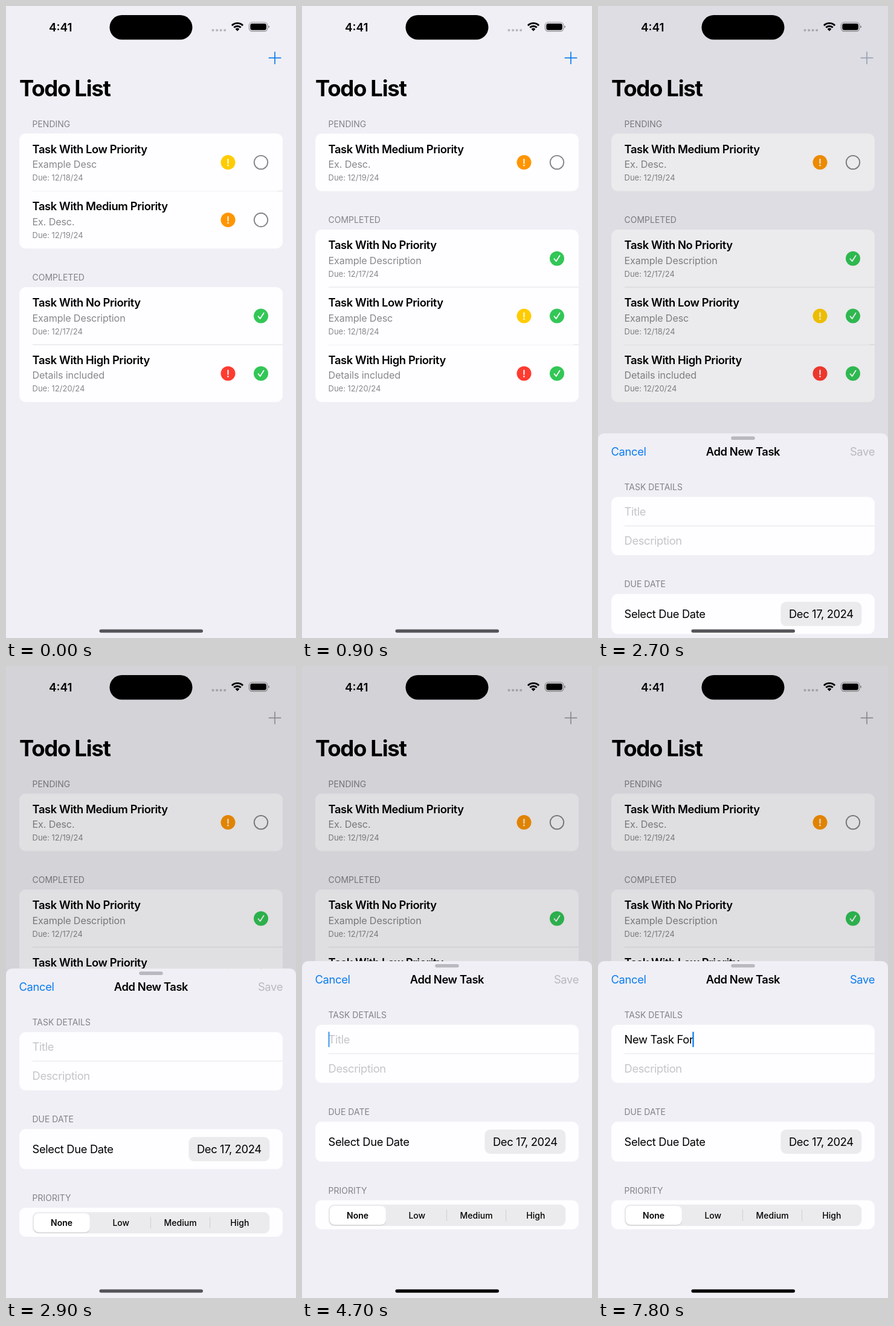
An HTML page that plays this animation: 480x1043 px, repeating every 8000 ms.

```html
<!DOCTYPE html>
<html lang="en">
<head>
<meta charset="utf-8">
<title>Todo List</title>
<style>
  html, body { margin: 0; width: 100%; height: 100%; overflow: hidden; background: #f0eff5; }
  svg { display: block; width: 100%; height: 100%; }
  text { font-family: Inter, "Open Sans", sans-serif; font-optical-sizing: none; white-space: pre; }
  .large { font-size: 36.6px; font-weight: 700; letter-spacing: -.037em; }
  .clock { font-size: 18.9px; font-weight: 600; }
  .headline { font-size: 18.4px; font-weight: 600; letter-spacing: -.022em; }
  .body { font-size: 18.4px; letter-spacing: -.02em; }
  .sub { font-size: 16.2px; letter-spacing: -.01em; fill: #88878b; }
  .caption { font-size: 13px; fill: #88878b; }
  .section { font-size: 14px; fill: #838287; }
  .segment { font-size: 14px; font-weight: 500; text-anchor: middle; }
  .on { font-weight: 600; }
  .card { fill: #fefdff; }
  .line { stroke: #e3e2e6; stroke-width: 1.1; }
  .hint { fill: #c5c4c8; }
  .blue { fill: #0a7cf0; }
  .mid { text-anchor: middle; }
  .end { text-anchor: end; }
</style>
</head>
<body>
<svg id="stage" viewBox="0 0 480 1043" xmlns="http://www.w3.org/2000/svg"></svg>
<script>
const LOOP = 8000, STEP = 100;
const ROW = 94.9, TOP = 210.5;
const SHEET_Y = 487, STAGE_H = 1043, DIM = 0.12;

const text = (cls, x, y, str, extra = '') =>
  `<text class="${cls}" x="${x}" y="${y}" ${extra}>${str}</text>`;
const box = (x, y, w, h, r, attrs) =>
  `<rect x="${x}" y="${y}" width="${w}" height="${h}" rx="${r}" ${attrs}/>`;
const line = (x1, y1, x2, y2, attrs = 'class="line"') =>
  `<line x1="${x1}" y1="${y1}" x2="${x2}" y2="${y2}" ${attrs}/>`;

const alertIcon = color => `<g transform="translate(367.5 47.6)">
  <circle r="12" fill="${color}"/>
  ${line(0, -5.2, 0, 1.4, 'stroke="#fff" stroke-width="2" stroke-linecap="round"')}
  <circle cy="5" r="1.3" fill="#fff"/></g>`;

const openIcon = id => `<circle id="${id}Open" cx="422" cy="47.6" r="11.2"
  fill="none" stroke="#858489" stroke-width="1.9"/>`;

const doneIcon = id => `<g id="${id}Done" transform="translate(422 47.6)">
  <circle r="12" fill="#32c756"/>
  <path d="M-4.5 .6L-1.3 4.5L4.6-4.8" fill="none" stroke="#fff" stroke-width="1.8"
    stroke-linecap="round" stroke-linejoin="round"/></g>`;

const tasks = [
  { id: 'medium', name: 'Medium', desc: 'Ex. Desc.', day: 19, color: '#ff9500', open: true },
  { id: 'none', name: 'No', desc: 'Example Description', day: 17, done: true },
  { id: 'high', name: 'High', desc: 'Details included', day: 20, color: '#ff3b30', done: true },
  { id: 'low', name: 'Low', desc: 'Example Desc', day: 18, color: '#ffcc00', open: true, done: true }
];

const row = t => `<g id="${t.id}">
  ${t.id === 'low' ? box(22, 0, 436, ROW, 11, 'class="card"') : ''}
  ${line(44, 0, 458, 0, `class="line" id="${t.id}Line"`)}
  ${text('headline', 43.5, 32, `Task With ${t.name} Priority`)}
  ${text('sub', 43.5, 56.6, t.desc)}
  ${text('caption', 43.5, 77.6, `Due: 12/${t.day}/24`)}
  ${t.color ? alertIcon(t.color) : ''}
  ${t.open ? openIcon(t.id) : ''}${t.done ? doneIcon(t.id) : ''}</g>`;

const list = `
  ${box(0, 0, 480, STAGE_H, 0, 'fill="#f0eff5"')}
  <path id="plus" d="M435.4 85.7H454.6M445 76.1V95.3" stroke-width="1.7" stroke-linecap="round"/>
  ${text('large', 22, 149, 'Todo List')}
  ${text('section', 43.5, 199.5, 'PENDING')}
  ${box(22, TOP, 436, ROW, 11, 'class="card" id="pendingCard"')}
  <g id="completed">${text('section', 43.5, 453, 'COMPLETED')}</g>
  ${box(22, 464, 436, ROW, 11, 'class="card" id="doneCard"')}
  ${tasks.map(row).join('')}
  ${box(0, 0, 480, STAGE_H, 0, 'id="dim"')}`;

const wifiArc = r => {
  const d = r * Math.SQRT1_2;
  return `M${383 - d} ${41.3 - d}A${r} ${r} 0 0 1 ${383 + d} ${41.3 - d}`;
};
const statusBar = `
  ${text('clock', 71, 41.6, '4:41')}
  ${box(171.5, 15, 137, 40.5, 20.2, '')}
  ${[342.5, 349.2, 355.6, 362.2].map(x => `<circle cx="${x}" cy="40" r="2.1" fill="#000" opacity=".23"/>`).join('')}
  <path d="${wifiArc(12.9)}${wifiArc(8.1)}" fill="none" stroke="#000" stroke-width="2.9"/>
  <path d="${wifiArc(4.8)}L383 41.6Z"/>
  ${box(402.4, 27, 30.4, 14.6, 4.6, 'fill="none" stroke="#000" stroke-opacity=".42" stroke-width="1.1"')}
  ${box(404.3, 28.9, 26.6, 10.8, 3, '')}
  <path d="M434.3 32q1.7 .7 1.7 2.3t-1.7 2.3z" opacity=".45"/>`;

const segments = ['None', 'Low', 'Medium', 'High'].map((s, i) =>
  text(i ? 'segment' : 'segment on', 92 + i * 98.3, 424.6, s)).join('');

const sheet = `<g id="sheet">
  <path d="M0 600V12Q0 0 12 0H468Q480 0 480 12V600Z" fill="#f0eff5"/>
  ${box(220.3, 5, 39.4, 5.6, 2.8, 'fill="#b9b8be"')}
  ${text('body blue', 21.5, 37, 'Cancel')}
  ${text('headline mid', 240, 37, 'Add New Task')}
  ${text('body end', 458, 37, 'Save', 'id="save"')}
  ${text('section', 43.5, 94, 'TASK DETAILS')}
  ${box(22, 105, 436, 96, 11, 'class="card"')}
  ${line(44, 152.7, 458, 152.7)}
  ${text('body hint', 43.5, 136, 'Title', 'id="hint"')}
  ${text('body', 43.5, 136, '', 'id="typed"')}
  ${box(0, 116.5, 2.3, 25.5, 1.1, 'class="blue" id="caret"')}
  ${text('body hint', 43.5, 184, 'Description')}
  ${text('section', 43.5, 253.6, 'DUE DATE')}
  ${box(22, 265, 436, 66, 11, 'class="card"')}
  ${text('body', 43.5, 304.6, 'Select Due Date')}
  ${box(302.5, 278, 133.8, 40, 9, 'fill="#ebeaec"')}
  ${text('body mid', 369.4, 304.6, 'Dec 17, 2024')}
  ${text('section', 43.5, 383.6, 'PRIORITY')}
  ${box(22, 394.7, 436, 48, 11, 'class="card"')}
  ${box(43.7, 401.8, 392.6, 35.4, 9.5, 'fill="#ebebed"')}
  ${box(45.5, 404.6, 93.6, 32, 8, 'fill="#000" opacity=".09"')}
  ${box(45.8, 403.9, 93, 31.2, 8, 'fill="#fff"')}
  ${[239.5, 337.6].map(x => line(x, 410, x, 429, 'stroke="#d2d1d5" stroke-width="1.1"')).join('')}
  ${segments}</g>`;

const stage = document.getElementById('stage');
stage.innerHTML = list + statusBar + sheet + box(154.5, 1028.7, 171.5, 5.6, 2.8, 'id="home"');
const el = id => document.getElementById(id);
const set = (id, attrs) => {
  for (const name in attrs) el(id).setAttribute(name, attrs[name]);
};
const moveTo = (id, y) => set(id, { transform: `translate(0 ${y})` });
const mix = (a, b, p) => `rgb(${a.map((v, i) => Math.round(v + (b[i] - v) * p))})`;

// Value of the last table entry that has started.
const at = (table, t) => table.reduce((value, [start, next]) => t >= start ? next : value, table[0][1]);

const typing = [[0, ''], [5500, 'N'], [5700, 'Ne'], [5800, 'New'], [6000, 'New '], [6300, 'New T'],
  [6800, 'New Ta'], [6900, 'New Tas'], [7100, 'New Task'], [7300, 'New Task '],
  [7400, 'New Task F'], [7600, 'New Task Fo'], [7800, 'New Task For']];
const caretAlpha = [[0, 0], [4100, .5], [4200, 1], [4700, .72], [4800, .35], [4900, 0], [5100, .5], [5200, 1]];
const homeColor = [[0, '#56555a'], [4100, '#2b2a2d'], [4200, '#000']];

function drawList(t) {
  const u = Math.min(1, Math.max(0, (t - 450) / 420));
  const p = u * u * (3 - 2 * u);
  const lift = ROW * p, doneTop = 464 - lift;
  set('pendingCard', { height: 2 * ROW - lift });
  set('doneCard', { y: doneTop, height: 2 * ROW + lift });
  moveTo('completed', -lift);
  moveTo('medium', TOP + ROW - lift);
  moveTo('none', doneTop);
  moveTo('high', 464 + ROW);
  moveTo('low', TOP + (464 - TOP) * p);
  set('mediumLine', { opacity: 1 - p });
  set('noneLine', { opacity: 0 });
  set('lowLine', { opacity: p });
  const done = t >= 500;
  set('lowOpen', { opacity: done ? 0 : 1 });
  set('lowDone', { opacity: done ? 1 : 0 });
}

function drawSheet(t) {
  // Critically damped spring, already under way on its first visible step.
  const w = 18.3 * (t - 2588) / 1000;
  const p = t < 2700 ? 0 : t >= 3300 ? 1 : 1 - (1 + w) * Math.exp(-w);
  moveTo('sheet', STAGE_H - (STAGE_H - SHEET_Y) * p);
  set('dim', { 'fill-opacity': DIM * p });
  const pressed = [168, 203, 244], muted = [158, 157, 162];
  set('plus', { stroke: t < 2400 ? '#0a7cf0' : mix(pressed, muted, p) });
}

function drawForm(t) {
  const value = at(typing, t);
  const typed = el('typed');
  if (typed.textContent !== value) typed.textContent = value;
  const width = value ? typed.getComputedTextLength() : 0;
  set('caret', { x: 43.4 + Math.max(0, width - 1), opacity: at(caretAlpha, t) });
  set('hint', { opacity: value ? 0 : 1 });
  set('save', { fill: value ? '#0a7cf0' : '#bab9be' });
  set('home', { fill: at(homeColor, t) });
}

const start = performance.now();
function frame() {
  const elapsed = (performance.now() - start) % LOOP;
  const t = Math.floor(elapsed / STEP) * STEP;
  drawList(t);
  drawSheet(t);
  drawForm(t);
  requestAnimationFrame(frame);
}
frame();
</script>
</body>
</html>
```
